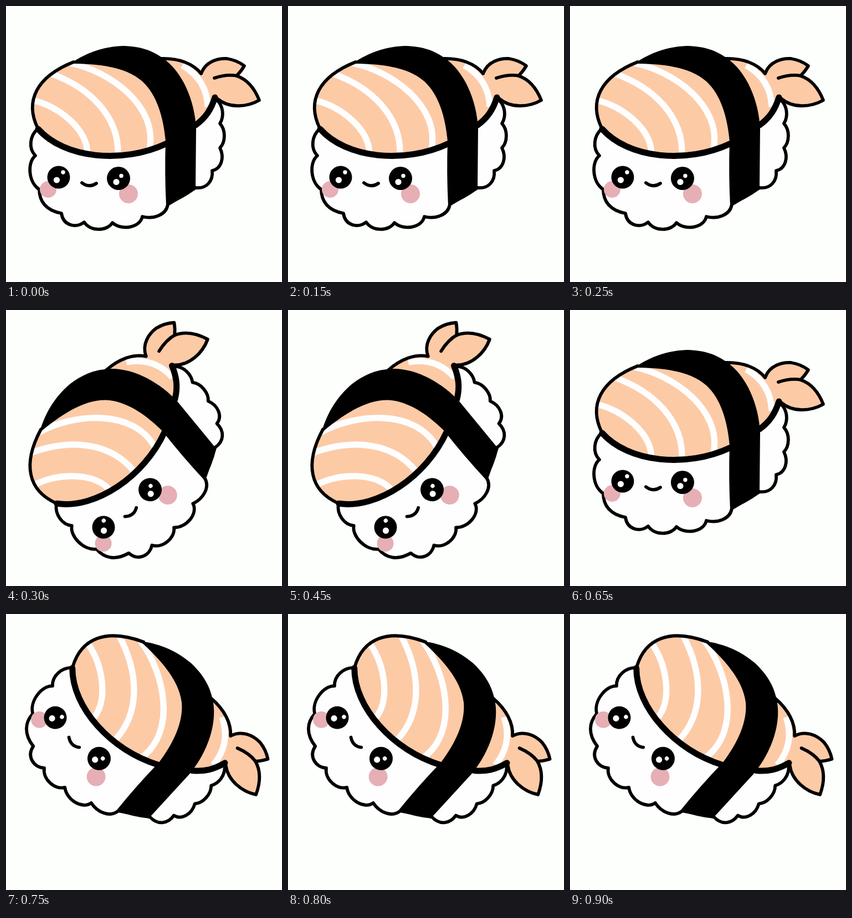
Write an HTML page that moves like this. It is 498 by 498 pixels and loops after 1 s.

```html
<!DOCTYPE html>
<html lang="en">
<head>
<meta charset="utf-8">
<title>Rocking sushi</title>
<style>
  html, body { margin: 0; height: 100%; overflow: hidden; background: #fdfffc; }
  svg { display: block; width: 100vw; height: 100vh; }
  .line { stroke: #000; stroke-width: 5.8; stroke-linecap: round; stroke-linejoin: round; }
  .thick { stroke-width: 11; }
  .none { fill: none; }
  .rice { fill: #fefefe; }
  .prawn { fill: #fdcaa6; }
  .stripe { fill: none; stroke: #fefefe; stroke-width: 11.3; }
  .cheek { fill: #e5afb5; }
</style>
</head>
<body>
<svg viewBox="0 0 498 498">
  <g id="sushi">
    <path class="rice line" d="M57 222 C43 234 40 257 53 270 C38 282 40 318 60 331
      C60 352 72 369 100 374 C103 396 126 402 141 390 C152 407 182 407 192 391
      C209 406 242 400 246 380 C265 385 289 378 292 358 L342 328
      C362 330 374 316 372 297 C388 294 395 274 386 256 C396 246 397 224 386 212
      C394 199 392 181 381 170 L300 120 L120 160 Z"/>

    <path class="prawn" d="M353 122 L378 112 L412 126 L400 170 L380 167 L350 160 Z"/>
    <path class="prawn line" d="M352 122 C360 100 382 94 399 95 C412 97 422 102 430 108 C426 115 421 121 416 126
      C437 133 449 150 457 170 C434 183 402 185 381 167"/>
    <path class="line none" d="M376 130 C388 126 402 123 417 126"/>

    <path class="prawn" d="M280 95 C312 94 338 104 353 122 L380 166 C372 188 362 204 340 218 Z"/>
    <path class="stripe" d="M318 107 C346 123 363 148 364 182"/>
    <path class="line none" d="M280 95 C312 94 338 104 352 122"/>
    <path class="line thick none" d="M377 165 C370 187 360 202 342 215"/>

    <path class="prawn" d="M57 220 C34 172 54 128 122 100 L230 100 L300 200 L290 247 C210 285 105 274 57 220 Z"/>
    <path class="stripe" d="M48 170 C95 181 146 221 147 266"/>
    <path class="stripe" d="M81 122 C151 147 204 199 202 268"/>
    <path class="stripe" d="M116 103 C186 117 274 179 259 258"/>
    <path class="line none" d="M57 220 C34 172 54 128 122 101"/>
    <path class="line thick none" d="M58 222 C105 275 210 286 290 248"/>

    <path d="M116 104 C150 81 181 73 212 72 C244 73 264 81 280 92 C319 117 341 172 343 222
      L342 331 Q318 349 289 360 Q286 300 288 244 C284 200 272 160 246 136 C215 109 165 104 116 104 Z"/>

    <circle class="cheek" cx="76" cy="331" r="15"/>
    <circle class="cheek" cx="221" cy="339" r="17"/>
    <circle cx="95" cy="309" r="20.5"/>
    <circle cx="203" cy="311" r="21"/>
    <g class="rice">
      <circle cx="91.5" cy="314" r="5.6"/>
      <circle cx="103" cy="300" r="3.7"/>
      <circle cx="199" cy="317.5" r="5.6"/>
      <circle cx="208" cy="306.5" r="3.7"/>
    </g>
    <path class="line none" d="M137 319 Q150 329 163 320"/>
  </g>
</svg>
<script>
  const sushi = document.getElementById('sushi');
  const upright = '';
  const left = 'translate(-95.4 216.4) rotate(-40)';
  const right = 'translate(225.2 -106.2) rotate(42)';

  // The sushi snaps between three poses.
  function poseAt(ms) {
    if (ms < 300) return upright;
    if (ms < 550) return left;
    if (ms < 750) return upright;
    return right;
  }

  function draw() {
    sushi.setAttribute('transform', poseAt(performance.now() % 1000));
    requestAnimationFrame(draw);
  }
  draw();
</script>
</body>
</html>
```
